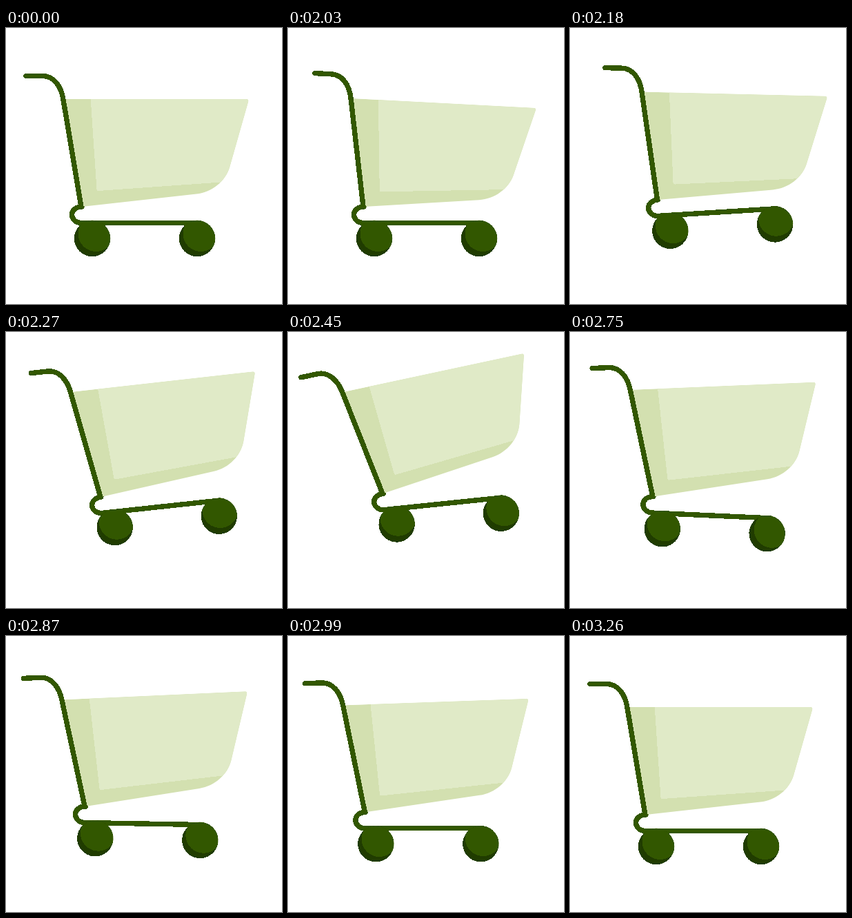
An HTML page that plays this animation: 400x400 px, repeating every 3.29 s.

```html
<!DOCTYPE html>
<html lang="en">
<head>
<meta charset="utf-8">
<title>Shopping cart</title>
<style>
  html, body { margin: 0; width: 100%; height: 100%; overflow: hidden; background: #fff; }
  svg { display: block; width: 100vw; height: 100vh; shape-rendering: crispEdges; }
  .frame { fill: none; stroke: #325700; stroke-width: 7.4; stroke-linecap: round; stroke-linejoin: round; }
  .tyre { fill: #203c00; }
  .hub { fill: #325700; }
  .side { fill: #d3e0b0; }
  .front { fill: #e0eac7; }
</style>
</head>
<body>
<svg viewBox="0 0 400 400">
  <defs>
    <clipPath id="rim"><circle r="26.2"/></clipPath>
    <clipPath id="tub">
      <path d="M85 103H348Q352 103 351 107L324 202C318 222 299 238 276 240.500L110 259Z"/>
    </clipPath>
    <g id="wheel">
      <circle class="tyre" r="26.2"/>
      <g clip-path="url(#rim)"><circle class="hub" cx="5.500" cy="-7" r="26"/></g>
    </g>
  </defs>
  <g id="cart">
    <g id="base">
      <path class="frame" d="M110 259C101 259 95.500 264.500 95.500 270.500S101 282.500 109 282.500H280"/>
      <g transform="translate(125 305)"><use id="rear" href="#wheel"/></g>
      <g transform="translate(277 305)"><use id="fore" href="#wheel"/></g>
    </g>
    <g id="basket">
      <g clip-path="url(#tub)">
        <path class="side" d="M80 100H360V262H80Z"/>
        <path class="front" d="M122.500 100H360V220.500L311 223.500L134 236Q131.700 236.200 131.500 234Z"/>
      </g>
      <path class="frame" d="M29 69.500H53C69 69.500 80 84 83 104L109 259"/>
    </g>
  </g>
</svg>
<script>
  const LOOP = 3290, START = 2030, STEP = 30;
  const HINGE = '109 259';

  const part = id => document.getElementById(id);
  const cart = part('cart'), base = part('base'), basket = part('basket');
  const rear = part('rear'), fore = part('fore');

  function turn(el, deg, at = '') {
    el.setAttribute('transform', `rotate(${deg} ${at})`);
  }

  function draw(ms) {
    const t = Math.floor((ms - START) / STEP) * STEP + START;

    // Smooth 0 to 1 between two times
    const ease = (from, to) => {
      const u = Math.min(Math.max((t - from) / (to - from), 0), 1);
      return u * u * (3 - 2 * u);
    };

    // Hop forward and up, then drift back down
    const x = 28 * ease(2040, 2280) - 22.5 * ease(2600, 2820) - 5.5 * ease(2820, 3130);
    const y = 24.7 * (ease(2620, 3110) - ease(2040, 2360));
    cart.setAttribute('transform', `translate(${x} ${y})`);

    // The basket starts with a jolt, swings back and settles
    const jolt = t >= START ? 3 : 0;
    turn(basket, jolt + ease(2030, 2110) - 18 * ease(2110, 2400) + 17 * ease(2400, 2640)
      - 5.6 * ease(2640, 2765) + 2.6 * ease(2930, 3130), HINGE);
    turn(base, 9 * ease(2400, 2750) - 6.4 * ease(2040, 2300) - 2.6 * ease(2750, 2960), HINGE);

    turn(rear, 20 * (ease(2600, 3100) - ease(2050, 2420)));
    turn(fore, 34 * ease(2250, 2600) - 22 * ease(2040, 2180)
      - 27 * ease(2750, 2960) + 15 * ease(2990, 3130));
  }

  const begin = performance.now();
  function tick() {
    draw((performance.now() - begin) % LOOP);
    requestAnimationFrame(tick);
  }
  tick();
</script>
</body>
</html>
```
